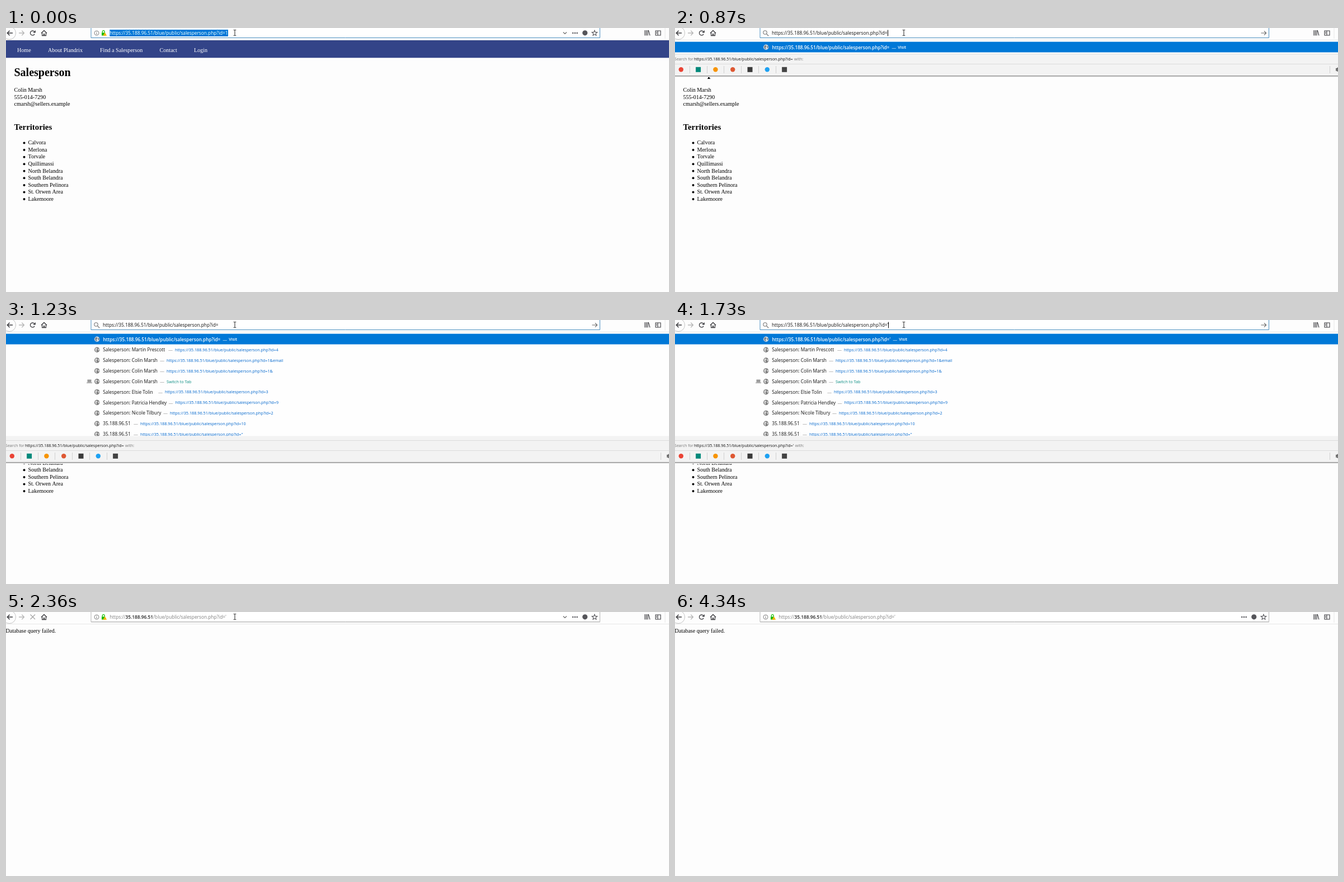
Write an HTML page with a canvas that moves like this. It is 1185 by 472 pixels and loops after 6360 ms.

```html
<!DOCTYPE html>
<html lang="en">
<head>
<meta charset="utf-8">
<title>Salesperson lookup</title>
<style>
html, body { margin: 0; width: 100%; height: 100%; overflow: hidden; background: #fdfdfd; }
canvas { display: block; }
</style>
</head>
<body>
<canvas id="stage" width="1185" height="472"></canvas>
<script>
const ctx = document.getElementById('stage').getContext('2d');
const LOOP = 6360;
const SANS = '"Open Sans", "Noto Sans", sans-serif';
const SERIF = '"Liberation Serif", "Noto Serif", serif';
const INK = '#3b3b3f', BLUE = '#0078d7';
const HOST = '35.188.96.51';
const PATH = '/blue/public/salesperson.php?id=';
const URL_BASE = 'https://' + HOST + PATH;

const regions = ['Calvora', 'Merlona', 'Torvale', 'Quillimassi', 'North Belandra',
  'South Belandra', 'Southern Pelinora', 'St. Orwen Area', 'Lakemoore'];
const person = 'Colin Marsh';
// name, id in the address, x of the address
const history = [
  ['Martin Prescott', '4', 302],
  [person, '1&email', 287],
  [person, '1&', 287],
  [person, null, 287],
  ['Elsie Tolin', '3', 284],
  ['Patricia Hendley', '9', 302.5],
  ['Nicole Tilbury', '2', 293],
  ['', '10', 240],
  ['', '"', 240]
];
const engines = [['circle', '#ea4335'], ['square', '#00897b'], ['circle', '#f79400'],
  ['circle', '#de5833'], ['square', '#3a3a3a'], ['circle', '#1da1f2'], ['square', '#444']];

// Draws text and returns the x where it ends.
function text(str, x, y, size, color = '#000', weight = 400, family = SANS) {
  ctx.font = `${weight} ${size}px ${family}`;
  ctx.fillStyle = color;
  ctx.fillText(str, x, y);
  return x + ctx.measureText(str).width;
}
const serif = (str, x, y, size = 10, color = '#000', weight = 400) =>
  text(str, x, y, size, color, weight, SERIF);

function rect(x, y, w, h, color) {
  ctx.fillStyle = color;
  ctx.fillRect(x, y, w, h);
}
function stroke(d, color = INK, width = 1.2) {
  ctx.strokeStyle = color;
  ctx.lineWidth = width;
  ctx.stroke(new Path2D(d));
}
function fill(d, color) {
  ctx.fillStyle = color;
  ctx.fill(new Path2D(d));
}
function disc(x, y, r, color) {
  ctx.fillStyle = color;
  ctx.beginPath();
  ctx.arc(x, y, r, 0, 7);
  ctx.fill();
}
function ring(x, y, r, color = INK, width = 1, from = 0, to = 2 * Math.PI) {
  ctx.strokeStyle = color;
  ctx.lineWidth = width;
  ctx.beginPath();
  ctx.arc(x, y, r, from, to);
  ctx.stroke();
}

function salesPage() {
  rect(0, 22, 1185, 31.3, '#334488');
  [['Home', 20], ['About Plandrix', 75], ['Find a Salesperson', 168], ['Contact', 274.5], ['Login', 336]]
    .forEach(([label, x]) => serif(label, x, 43, 10.1, '#fff'));
  serif('Salesperson', 14.5, 86.4, 20, '#000', 700);
  [person, '555-014-7290', 'cmarsh@sellers.example']
    .forEach((line, i) => serif(line, 14.5, 114 + i * 12.57));
  serif('Territories', 14.5, 182, 14.8, '#000', 700);
  regions.forEach((name, i) => {
    const y = 208.3 + i * 12.57;
    disc(32.5, y - 2.8, 2, '#000');
    serif(name, 39.5, y);
  });
}

function reloadIcon(t) {
  if (t >= 2100 && t < 2480) {
    stroke('M43.5 4.5l8.5 8.5m0-8.5l-8.5 8.5', '#a0a0a0', 1.1);
  } else if (t >= 1980 && t < 2100) {
    ring(48, 9, 4, '#777', 1.3, 2.3, 7.1);
  } else {
    const color = t >= 2480 && t < 2970 ? '#aaa' : INK;
    ring(47.5, 9, 4, color, 1.4, 0.5, 5.5);
    fill('M52.8 4v4.6h-4.6z', color);
  }
}

function toolbar(t) {
  rect(0, 0, 1185, 21, '#fdfdfd');
  rect(0, 21, 1185, 1, '#e6e6e6');
  ring(6, 9, 11.5, '#c4c4c4');
  stroke('M12 9H2.5M6.5 4.8L2.3 9l4.2 4.2', INK, 1.5);
  stroke('M23 9h9.3M28.2 4.8L32.4 9l-4.2 4.2', '#b5b5b5', 1.3);
  reloadIcon(t);
  stroke('M63 9.3l5-4.8 5 4.8M64.6 8.5v5h6.8v-5', INK, 1.3);
  rect(67, 10, 2, 3.5, INK);
  stroke('M1142 4v9.5M1144.5 4v9.5M1147 4v9.5M1148.3 4.2l2.6 9.2', INK, 1.2);
  stroke('M1161 5h9v8h-9zM1165 5v8M1162.2 7.5h1.6M1162.2 9.5h1.6', INK, 1.1);
  rect(1177.5, 0, 1, 19, '#e8e8e8');
}

function addressBar(t) {
  const focused = t < 1980, searching = t >= 750 && t < 2240;
  rect(152, 0, 909.5, 17.5, '#fff');
  if (!focused) rect(152, 18, 910, 1, '#e4e4e4');
  stroke('M152 0V17.5H1061.5V0', focused ? '#4a8fc0' : '#b4b4b4', 1);
  const x = searching ? 173 : 185.3, y = 12.2;

  if (searching) {
    ring(161, 8, 3.2, '#777', 1.1);
    stroke('M163.4 10.4l3.8 3.8', '#777', 1.3);
    if (focused) stroke('M1047.5 9h9M1053 5.3L1056.7 9l-3.7 3.7', '#666', 1.1);
  } else {
    ring(162, 9, 4, '#777', 0.9);
    rect(161.5, 8.2, 1, 3.2, '#777');
    rect(161.5, 6.4, 1, 1, '#777');
    stroke('M172.2 8.5V6.7a2 2 0 0 1 4 0v1.8', '#12bc00', 1.2);
    rect(171, 8.3, 6.2, 5.2, '#12bc00');
    fill('M176.7 7.8l3.4 5.9h-6.8z', '#f5b400');
    pageActions(t);
  }

  if (t < 500) {
    rect(185.3, 3, 211.7, 12, BLUE);
    text(URL_BASE + '1', x, y, 8.3, '#fff');
  } else if (focused) {
    const id = t < 750 ? '1' : t < 1730 ? '' : "'";
    const end = text(URL_BASE + id, x, y, 8.3, '#111');
    if (t < 1230 || t >= 1730) rect(Math.round(end), 3.5, 1, 11, '#000');
  } else {
    const hostX = text('https://', x, y, 8.3, '#808080');
    const pathX = text(HOST, hostX, y, 8.3, '#222', 600);
    text(PATH + "'", pathX, y, 8.3, '#808080');
  }
}

function pageActions(t) {
  if (t < 3710) stroke('M996 7.5l3 3 3-3', t < 3590 ? '#666' : '#8a8a8a', 1.2);
  [1013.3, 1017, 1020.7].forEach(x => disc(x, 9, 1.3, '#55555a'));
  disc(1034.8, 8.8, 4.6, '#55555a');
  let star = '';
  for (let i = 0; i < 10; i++) {
    const r = i % 2 ? 2.2 : 5, a = i * Math.PI / 5;
    star += `${i ? 'L' : 'M'}${1052 + r * Math.sin(a)} ${9.2 - r * Math.cos(a)}`;
  }
  stroke(star + 'z', '#55555a', 1.1);
}

function globe(y, light) {
  const land = light ? '#6f7c88' : '#d8d8d8';
  disc(162.7, y, 4.7, light ? '#d3dbe2' : '#7d7d7d');
  fill(`M159.5 ${y - 2.5}l3-1 1 2.2-2 1.6 1 2.4-1.6 1-1.5-3z`, land);
  fill(`M164.3 ${y - 1.5}l2-1 .6 2.8-1.8 1.8z`, land);
}

function historyRow([name, id, linkX], i) {
  const y = 53.2 + i * 18.87;
  globe(y, false);
  text(name ? 'Salesperson: ' + name : HOST, 173.3, y + 3, 8.3, '#111');
  text('—', linkX - 12, y + 3, 8, '#888');
  if (id === null) {
    rect(145.5, y - 3.3, 7, 5, '#999');
    rect(144, y + 2, 10, 1.2, '#999');
    text('Switch to Tab', linkX, y + 2.8, 7.25, '#058b80', 500);
  } else {
    text(URL_BASE + id, linkX, y + 2.8, 7.25, '#0066cc', 500);
  }
}

function dropdown(t) {
  const open = t < 990 ? 0 : t < 1110 ? 0.5 : 1;
  const shift = 169 * open;
  const query = URL_BASE + (t < 1730 ? '' : "'");
  rect(0, 22, 1185, 63 + shift, '#fefefe');
  rect(0, 24.6, 1185, 18.9, BLUE);
  globe(34.3, true);
  const end = text(query, 173.5, 37.6, 8.2, '#fff', 600);
  text('—', end + 4, 37.6, 8, '#fff');
  text('Visit', end + 15, 37.3, 7.25, '#fff', 600);

  ctx.save();
  ctx.beginPath();
  ctx.rect(0, 43.5, 1185, 164 * open);
  ctx.clip();
  history.forEach(historyRow);
  ctx.restore();

  ctx.save();
  ctx.translate(0, shift);
  rect(0, 46 - 7.5 * open, 1185, 39 + 7.5 * open, '#f3f3f3');
  rect(0, 46, 1185, 1, '#dcdcdc');
  rect(0, 64, 1185, 1, '#dcdcdc');
  text('Search for', -1, 58, 7.1, '#777');
  const queryEnd = text(query, 34, 58, 7.1, '#111');
  text('with:', queryEnd + 2.5, 58, 7.1, '#777');
  engines.forEach(([shape, color], i) => {
    const x = 10.8 + i * 30.8;
    if (shape === 'circle') disc(x, 74.3, 4.2, color);
    else rect(x - 4.5, 69.8, 9, 9, color);
    if (i < 6) rect(Math.round(x + 15), 68, 1, 13, '#d0d0d0');
  });
  rect(1170, 68, 1, 13, '#d0d0d0');
  ring(1184, 74.3, 2.2, '#555', 1.2);
  stroke('M1184 70.5v7.6M1180.8 72.3l6.4 4M1180.8 76.3l6.4-4', '#555', 0.9);
  rect(0, 85, 1185, 1, '#919191');
  rect(0, 86, 1185, 1, '#c8c8c8');
  rect(0, 87, 1185, 1, '#ededed');
  ctx.restore();
}

function pointer(t) {
  if (t < 3590) {
    stroke('M406.8 3.5h1.6l.6.6.6-.6h1.6M409 4v9M406.8 13.5h1.6l.6-.6.6.6h1.6', '#222', 1);
  } else if (t >= 3710 && t < 4340) {
    // Straight sweep towards the lower right corner, in steps.
    const step = Math.min(Math.floor((t - 3590) / 120), 4);
    const p = t < 4220 ? 1 - (1 - step / 4) ** 1.4 : 1.16;
    const x = 409 + 637 * p, y = 8 + 393 * p;
    const arrow = `M${x} ${y}v10.5l2.4-2.2 1.7 3.7 1.5-.7-1.7-3.6h3.3z`;
    fill(arrow, '#fff');
    stroke(arrow, '#000', 0.8);
  }
}

function draw(t) {
  rect(0, 0, 1185, 472, '#fdfdfd');
  if (t < 2240) salesPage();
  else serif('Database query failed.', -0.5, 37.3);
  toolbar(t);
  addressBar(t);
  if (t >= 870 && t < 1980) dropdown(t);
  pointer(t);
}

const start = performance.now();
function tick() {
  draw((performance.now() - start) % LOOP);
  requestAnimationFrame(tick);
}
tick();
</script>
</body>
</html>
```
